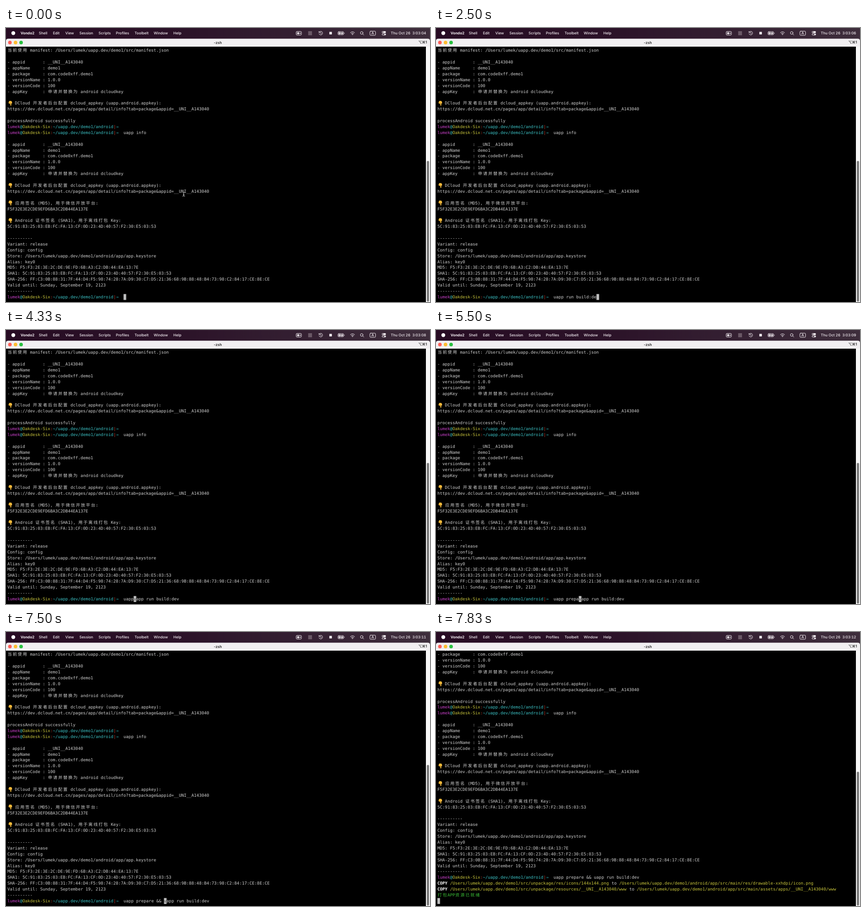
These frames come from a looping animation (930 by 602 pixels, 8 s). An HTML page:

```html
<!DOCTYPE html>
<html lang="en">
<head>
<meta charset="utf-8">
<title>Terminal session</title>
<style>
  html, body { margin: 0; width: 100%; height: 100%; overflow: hidden; background: #000; }
  svg { display: block; width: 100%; height: 100%; }
  text { white-space: pre; text-rendering: geometricPrecision; }
  .term text { font: 9.2px "DejaVu Sans Mono", "Noto Sans CJK SC", "Noto Sans CJK", monospace; }
  .term .wide { font-family: "Noto Sans CJK SC", "Noto Sans CJK", sans-serif; }
  .term .bold { font-weight: 700; }
  .bar text { font: 500 8px Inter, sans-serif; fill: #f4eef3; font-variant-numeric: tabular-nums; }
  .bar .app { font-weight: 700; }
  .title text { font: 700 8px Inter, "DejaVu Sans", sans-serif; fill: #3a3a3a; }
  .line { fill: none; stroke: #f4eef3; stroke-width: 1; stroke-linecap: round; }
</style>
</head>
<body>
<svg viewBox="0 0 930 602" preserveAspectRatio="none">
  <defs>
    <linearGradient id="sky">
      <stop offset="0" stop-color="#270c23"/>
      <stop offset=".4" stop-color="#2b1228"/>
      <stop offset="1" stop-color="#3e2e3c"/>
    </linearGradient>
    <g id="hand">
      <path d="M2.6 0H7.2Q9.2 1.6 9 4.4Q8.9 5.8 8 6L7.2 5.2V9.4Q7.1 10.6 6.2 10.6Q5.2 10.6 5.1 9.4V6.2Q4.4 6.8 3.7 6.2Q2.8 6.5 2.3 5.6Q1 5.4 1.1 4Z" fill="#f8bd3c"/>
      <path d="M5.1 6V4M3.7 6V4M2.3 5.4V3.6" stroke="#b97a10" stroke-width=".5"/>
    </g>
    <path id="ibeam" d="M387.2 360.4q2.6 0 2.6 1.6v6q0 1.6-2.6 1.6M392.4 360.4q-2.6 0-2.6 1.6M392.4 369.6q-2.6 0-2.6-1.6M388.4 366h2.8"/>
  </defs>
  <rect width="930" height="602"/>
  <g class="term" id="page"></g>

  <rect x="921" y="41" width="9" height="561" fill="#f7f7f7"/>
  <rect id="thumb" x="923" width="5" rx="2.5" fill="#7d7d7d"/>

  <g class="bar">
    <rect width="930" height="28" fill="url(#sky)"/>
    <g id="menu"></g>
    <circle cx="16" cy="11.3" r="4.2" fill="#fff"/>
    <rect class="line" x="636.5" y="7.5" width="11.5" height="8" rx="1.8"/>
    <path d="M638.5 9.5h4.5v4h-4.5zM643.5 11.5l2.7-1.8v3.6z" fill="#f4eef3"/>
    <rect x="662.8" y="7" width="8.4" height="9" fill="#6a5866"/>
    <path class="line" d="M686.9 9.3A4 4 0 1 1 686.6 12.5M686.4 7.6v2.2h2.2M690.4 9.2v2.6l1.7 1"/>
    <rect x="709.2" y="8.5" width="5.6" height="5.6" fill="#f4eef3"/>
    <rect class="line" x="728.2" y="8" width="12.4" height="6.8" rx="1.8"/>
    <rect x="729.6" y="9.4" width="9.6" height="4" rx=".8" fill="#f4eef3"/>
    <path d="M735.6 7.4l-3 4.5h2l-.9 3.4 3.2-4.6h-2z" fill="#f4eef3" stroke="#33202f" stroke-width=".5"/>
    <path d="M741.9 10.2v2.4q1-.4 1-1.2t-1-1.2z" fill="#f4eef3"/>
    <path class="line" d="M755.3 10.3Q760 6.1 764.7 10.3M757.2 12.3Q760 9.9 762.8 12.3"/>
    <path d="M758.4 13.8q1.6-1.2 3.2 0L760 15.4z" fill="#f4eef3"/>
    <circle class="line" cx="780.2" cy="10.8" r="2.9"/>
    <path class="line" d="M782.4 13l2.4 2.4"/>
    <rect class="line" x="798.2" y="7" width="12.4" height="9" rx="1.8"/>
    <text x="804.4" y="14.4" text-anchor="middle">A</text>
    <rect x="824.4" y="6.9" width="9" height="4" rx="2" fill="#f4eef3"/>
    <circle cx="826.6" cy="8.9" r="1.1" fill="#33202f"/>
    <rect class="line" x="824.8" y="12.4" width="8.2" height="3.2" rx="1.6"/>
    <circle cx="831.2" cy="14" r="1.5" fill="#f4eef3"/>
    <text id="clock" x="844" y="14.2"></text>
  </g>

  <g class="title">
    <path d="M0 41V28.5Q0 23.5 5 23.5H925Q930 23.5 930 28.5V41Z" fill="#f1eff1"/>
    <circle cx="8.6" cy="31.9" r="3.9" fill="#fe5f57"/>
    <circle cx="20.9" cy="31.9" r="3.9" fill="#febc2e"/>
    <circle cx="33.1" cy="31.9" r="3.9" fill="#28c03f"/>
    <text x="464.6" y="34.6" text-anchor="middle">-zsh</text>
    <text x="923.5" y="34.4" text-anchor="end">⌥⌘1</text>
  </g>

  <g id="beam" fill="none">
    <use href="#ibeam" stroke="#000" stroke-width="2.2"/>
    <use href="#ibeam" stroke="#e4e4e4"/>
  </g>
</svg>
<script>
const LOOP = 8000, LEFT = 3, CELL = 5.539, TOP = 43.1, ROW = 12.893, PROMPT_ROW = 42;
const C = { white: '#cfcfcf', red: '#c93a28', green: '#3cbf36', yellow: '#c8c53c',
            magenta: '#c63fc6', cyan: '#3cc3c6', bright: '#fff' };
const $ = id => document.getElementById(id);
const page = $('page');

function add(parent, tag, attrs, text) {
  const el = document.createElementNS('http://www.w3.org/2000/svg', tag);
  for (const k in attrs) el.setAttribute(k, attrs[k]);
  if (text !== undefined) el.textContent = text;
  parent.append(el);
  return el;
}
const colX = col => LEFT + col * CELL;
const rowY = row => TOP + row * ROW;

// Puts coloured runs on the character grid; CJK and emoji take two cells.
function print(row, runs, parent = page) {
  const y = rowY(row) + 9.3;
  let col = 0;
  for (const [str, fill = C.white, style = ''] of runs) {
    for (const part of str.match(/👇|[\u4e00-\u9fff]|[^\u4e00-\u9fff👇]+/gu)) {
      if (part === '👇') {
        add(parent, 'use', { href: '#hand', x: colX(col) + 1.4, y: rowY(row) + 1 });
        col += 2;
      } else if (/[\u4e00-\u9fff]/.test(part)) {
        add(parent, 'text', { class: 'wide', x: colX(col) + .6, y, fill }, part);
        col += 2;
      } else {
        add(parent, 'text', { class: style, x: colX(col), y, fill }, part);
        col += part.length;
      }
    }
  }
  return col;
}

const HOME = '/Users/lumek/uapp.dev/demo1';
const prompt = [['lumek', C.magenta], ['@', C.cyan], ['Oakdesk-Six', C.yellow], [':', C.red],
  ['~/uapp.dev/demo1/android', C.cyan], ['|', C.red], ['⇒  ', C.cyan]];
const info = `
- appid       : __UNI__A143040
- appName     : demo1
- package     : com.code0xff.demo1
- versionName : 1.0.0
- versionCode : 100
- appKey      : 申请并替换为 android dcloudkey

👇 DCloud 开发者后台配置 dcloud_appkey (uapp.android.appkey):
https://dev.dcloud.net.cn/pages/app/detail/info?tab=package&appid=__UNI__A143040
`;
const sign = `👇 应用签名 (MD5), 用于微信开放平台:
F5F32E3E2CDE9EFD6BA3C2DB44EA137E

👇 Android 证书签名 (SHA1), 用于离线打包 Key:
5C:91:83:25:03:EB:FC:FA:13:CF:0D:23:4D:40:57:F2:30:E5:03:53

----------
Variant: release
Config: config
Store: ${HOME}/android/app/app.keystore
Alias: key0
MD5: F5:F3:2E:3E:2C:DE:9E:FD:6B:A3:C2:DB:44:EA:13:7E
SHA1: 5C:91:83:25:03:EB:FC:FA:13:CF:0D:23:4D:40:57:F2:30:E5:03:53
SHA-256: FF:C3:0B:88:31:7F:44:D4:F5:98:74:28:7A:D9:30:C7:D5:21:36:68:9B:88:48:B4:73:98:C2:84:17:CE:8E:CE
Valid until: Sunday, September 19, 2123
----------`;

const plain = block => block.split('\n').map(s => s ? [[s]] : []);
[
  [[`当前使用 manifest: ${HOME}/src/manifest.json`]],
  ...plain(info),
  [['processAndroid successfully']],
  prompt,
  [...prompt, ['uapp info']],
  ...plain(info),
  ...plain(sign)
].forEach((runs, i) => print(i, runs));
const inputCol = print(PROMPT_ROW, prompt);

const output = add(page, 'g', {});
const copy = (from, to) => [['COPY ', C.bright, 'bold'], [HOME + from, C.yellow], [' to '], [HOME + to, C.yellow]];
[
  copy('/src/unpackage/res/icons/144x144.png', '/android/app/src/main/res/drawable-xxhdpi/icon.png'),
  copy('/src/unpackage/resources/__UNI__A143040/www', '/android/app/src/main/assets/apps/__UNI__A143040/www'),
  [['打包APP资源已就绪', C.green]]
].forEach((runs, i) => print(PROMPT_ROW + 1 + i, runs, output));

const inputY = rowY(PROMPT_ROW) + 9.3;
const input = add(page, 'text', { x: colX(inputCol), y: inputY, fill: C.white });
const caret = add(page, 'rect', { width: CELL + .3, height: 13, fill: '#bdbdbd' });
const under = add(page, 'text', { y: inputY, fill: '#444' });

[['Vondo2', 32], ['Shell', 72], ['Edit', 103], ['View', 130], ['Session', 161], ['Scripts', 203],
 ['Profiles', 241], ['Toolbelt', 282], ['Window', 324], ['Help', 367]].forEach(([s, x], i) =>
  add($('menu'), 'text', { class: i ? '' : 'app', x, y: 14.2 }, s));

// Characters typed after each tick of a sixth of a second.
const RUN = 'uapp run build:dev', PREPARE = 'uapp prepare && ';
const runKeys = [0, 1, 2, 4, 5, 7, 8, 9, 9, 10, 11, 12, 13, 14, 16, 17, 18];
const prepareKeys = [0, 1, 2, 3, 4, 5, 6, 7, 8, 9, 9, 10, 11, 12, 13, 13, 14, 15, 16];
const HOME_KEY = 20, PREPARE_START = 22, ENTER = 46, DONE = 47;
const at = (list, i) => list[Math.max(0, Math.min(list.length - 1, i))];

function draw(t) {
  const tick = Math.floor((t + 5) * 6 / 1000);
  const typed = RUN.slice(0, at(runKeys, tick));
  const before = PREPARE.slice(0, at(prepareKeys, tick - PREPARE_START));
  const line = before + typed;
  const pos = tick < HOME_KEY ? line.length : before.length;
  const scroll = tick >= DONE ? 4 : tick >= ENTER ? 1 : 0;

  input.textContent = line;
  caret.setAttribute('x', colX(scroll ? 0 : inputCol + pos));
  caret.setAttribute('y', rowY(PROMPT_ROW + scroll) - .1);
  under.setAttribute('x', colX(inputCol + pos));
  under.textContent = scroll ? '' : line.charAt(pos);
  output.style.display = tick >= DONE ? '' : 'none';
  page.setAttribute('transform', `translate(0 ${-scroll * ROW})`);

  const top = 292 + scroll * 3.75;
  $('thumb').setAttribute('y', top);
  $('thumb').setAttribute('height', 601 - top);
  $('beam').style.display = tick < 1 ? '' : 'none';
  const sec = 4 + Math.floor((t + 335) / 1000);
  $('clock').textContent = `Thu Oct 26  3:03:${String(sec).padStart(2, '0')}`;
}

const start = performance.now();
function loop() {
  draw((performance.now() - start) % LOOP);
  requestAnimationFrame(loop);
}
draw(0);
loop();
</script>
</body>
</html>
```
